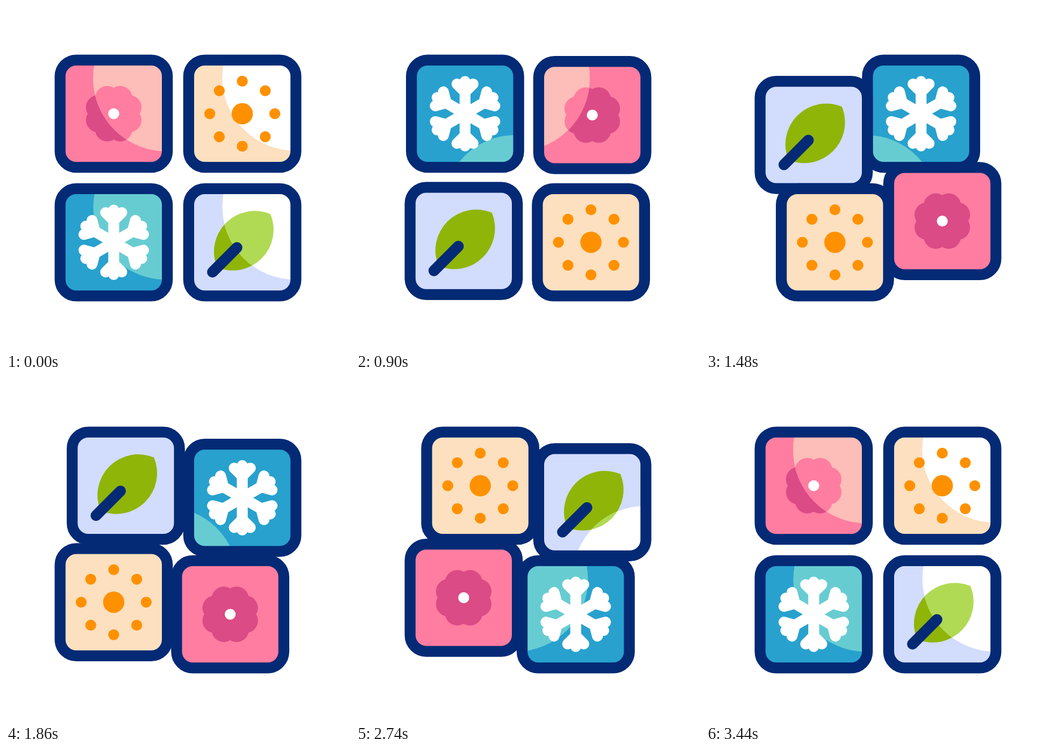
Write an HTML page that moves like this. It is 640 by 640 pixels and loops after 3.8 s.

```html
<!DOCTYPE html>
<html lang="en">
<head>
<meta charset="utf-8">
<title>Four seasons</title>
<style>
  html, body { margin: 0; width: 100%; height: 100%; overflow: hidden; background: #fff; }
  svg { display: block; width: 100vw; height: 100vh; }
</style>
</head>
<body>
<svg id="stage" viewBox="0 0 640 640"></svg>
<script>
const LOOP = 3800, STEP = 850, REACH = 119.6, LINE = 20.3;
const NAVY = '#042a75', ORANGE = '#ff9100';

const ring = (n, start, fn) =>
  Array.from({ length: n }, (_, i) => fn(start + i * 360 / n)).join('');
const dot = (x, y, r, fill = '') =>
  `<circle cx="${x.toFixed(2)}" cy="${y.toFixed(2)}" r="${r}"${fill && ` fill="${fill}"`}/>`;
const polar = (deg, d, r) =>
  dot(d * Math.cos(deg * Math.PI / 180), d * Math.sin(deg * Math.PI / 180), r);
const stroke = (d, color) =>
  `<path d="${d}" fill="none" stroke="${color}" stroke-width="${LINE}" stroke-linecap="round"/>`;

const flower = fill =>
  `<g fill="${fill}">${ring(8, 22.5, a => polar(a, 31, 23))}${dot(0, 0, 30)}</g>`;
const leaf = fill =>
  `<path fill="${fill}" d="M52.4-52.6A76 76 0 0 0-46.9 46.7A76 76 0 0 0 52.4-52.6Z"/>`;
const sun = `<g fill="${ORANGE}">${dot(0, 0, 19.8)}${ring(8, 0, a => polar(a, 60.5, 10.2))}</g>`;
const snow = ring(6, 0, a =>
  `<g transform="rotate(${a})">${stroke('M0 0V-60M-15-55.3L0-40.5L15-55.3', '#fff')}</g>`);
const none = () => '';

// Listed back to front; glow is a disc fixed on the stage: x, y, radius.
const tiles = [
  { corner: 0, back: ['#ff7da0', '#fdbdb8'], shape: flower, tint: ['#db4b86', '#ff7da0'],
    top: dot(0, 0, 10.2, '#fff'), glow: [298.5, 133.8, 136.6] },
  { corner: 3, back: ['#28a1ce', '#67ccd2'], shape: none, tint: [],
    top: snow, glow: [297, 374.5, 134.6] },
  { corner: 2, back: ['#d2dcfd', '#fff'], shape: leaf, tint: ['#8fb508', '#b0da54'],
    top: stroke('M-55.4 55.4L-10 9.9', NAVY), glow: [538, 373.5, 135.5] },
  { corner: 1, back: ['#fce0bf', '#fff'], shape: none, tint: [],
    top: sun, glow: [538, 133.4, 135.7] }
];

const square = attrs => `<rect x="-99.75" y="-99.75" width="199.5" height="199.5" rx="30" ${attrs}/>`;
const layer = (t, i) => square(`fill="${t.back[i]}"`) + t.shape(t.tint[i]);

const stage = document.getElementById('stage');
stage.innerHTML = tiles.map((t, i) => `
  <g class="tile">
    <clipPath id="glow${i}"><circle r="${t.glow[2]}"/></clipPath>
    ${layer(t, 0)}
    <g clip-path="url(#glow${i})">${layer(t, 1)}</g>
    ${t.top}
    ${square(`fill="none" stroke="${NAVY}" stroke-width="${LINE}"`)}
  </g>`).join('');

stage.querySelectorAll('.tile').forEach((el, i) => {
  tiles[i].el = el;
  tiles[i].disc = el.querySelector('clipPath circle');
});

const corners = [[-1, -1], [1, -1], [1, 1], [-1, 1]];
const ease = u => u * u * (3 - 2 * u);

function draw(ms) {
  const turn = Math.min(ms / STEP, 4);
  const whole = Math.floor(turn);
  const p = ease(turn - whole);
  for (const t of tiles) {
    const a = corners[(t.corner + whole) % 4];
    const b = corners[(t.corner + whole + 1) % 4];
    const [x, y] = a.map((v, k) => 320 + REACH * (v + (b[k] - v) * p));
    t.el.setAttribute('transform', `translate(${x.toFixed(3)} ${y.toFixed(3)})`);
    t.disc.setAttribute('cx', (t.glow[0] - x).toFixed(3));
    t.disc.setAttribute('cy', (t.glow[1] - y).toFixed(3));
  }
}

const begin = performance.now();
function tick() {
  draw((performance.now() - begin) % LOOP);
  requestAnimationFrame(tick);
}
draw(0);
requestAnimationFrame(tick);
</script>
</body>
</html>
```
